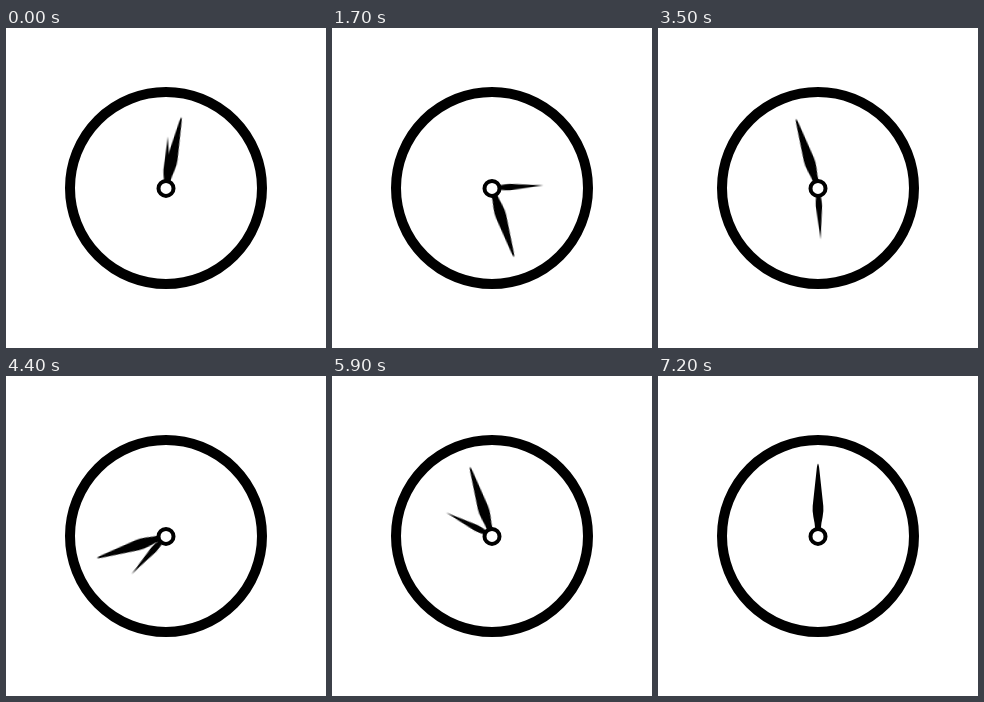
An HTML page that plays this animation: 320 by 320 pixels, repeating every 7.3 s.

```html
<!DOCTYPE html>
<html lang="en">
<head>
<meta charset="utf-8">
<title>Clock</title>
<style>
  html, body { margin: 0; width: 100%; height: 100%; overflow: hidden; background: #fff; }
  svg { display: block; width: 100%; height: 100%; }
  .ring, .hub { fill: #fff; stroke: #000; }
  .ring { stroke-width: 10; }
  .hub { stroke-width: 4; }
  .hand { transform-origin: 0 0; animation: 7300ms infinite; }
  .minute { animation-name: minute; }
  .hour { animation-name: hour; }

  /* 72 ticks of 100 ms, then a short rest at twelve */
  @keyframes minute {
    0% { transform: rotate(12.3deg); animation-timing-function: steps(72); }
    98.62% { transform: rotate(2172.3deg); animation-timing-function: step-end; }
    98.625%, 100% { transform: rotate(2160deg); }
  }
  @keyframes hour {
    0% { transform: rotate(2.05deg); animation-timing-function: steps(72); }
    98.62% { transform: rotate(362.05deg); animation-timing-function: step-end; }
    98.625%, 100% { transform: rotate(360deg); }
  }
</style>
</head>
<body>
<svg viewBox="0 0 320 320">
  <g transform="translate(160 160)">
    <circle class="ring" r="96"/>
    <path class="hand hour" d="M0-51.5 L3.2-18 Q3.2-14 2.2-7 H-2.2 Q-3.2-14-3.2-18Z"/>
    <path class="hand minute" d="M0-72.5 Q1-71 1.4-66 L5.3-30 Q5.8-25 4.6-19 Q3.2-13 2.8-7 H-2.8 Q-3.2-13-4.6-19 Q-5.8-25-5.3-30 L-1.4-66 Q-1-71 0-72.5Z"/>
    <circle class="hub" cy=".4" r="7.5"/>
  </g>
</svg>
</body>
</html>
```
